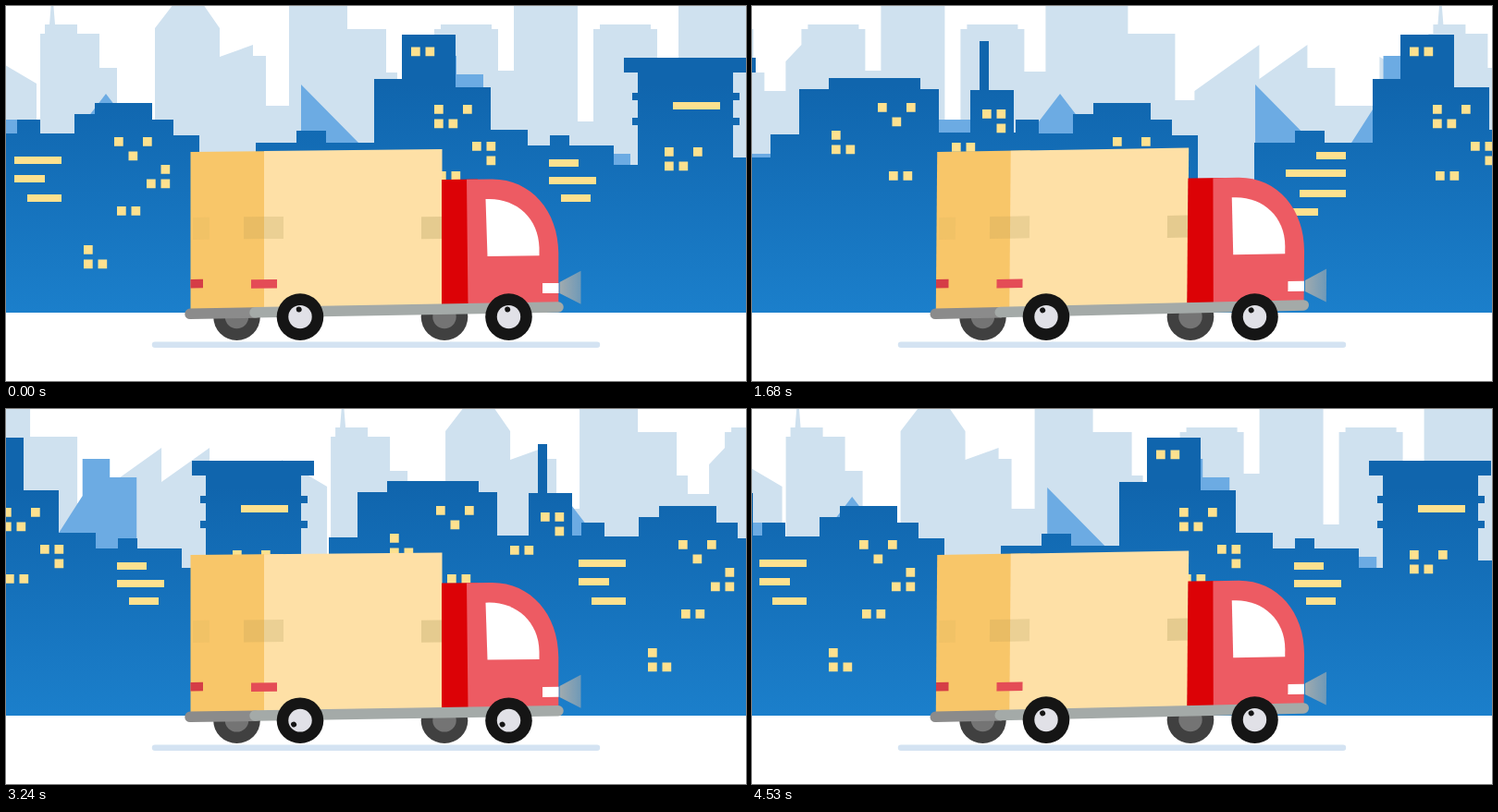
Recreate the animation shown at these times as an HTML page. Size 800 px wide and 406 px high, loop 4.56 s.

```html
<!DOCTYPE html>
<html lang="en">
<head>
<meta charset="utf-8">
<title>Delivery truck</title>
<style>
  html, body { margin: 0; width: 100%; height: 100%; overflow: hidden; background: #fff; }
  svg { display: block; width: 800px; height: 406px; }
  .soft { filter: blur(0.7px); }
</style>
</head>
<body>
<svg viewBox="0 0 800 406">
  <defs>
    <linearGradient id="city" gradientUnits="userSpaceOnUse" x1="0" y1="85" x2="0" y2="332">
      <stop offset="0" stop-color="#1065ad"/>
      <stop offset="1" stop-color="#1b7fcb"/>
    </linearGradient>
    <linearGradient id="beam">
      <stop offset="0" stop-color="#a8adad" stop-opacity=".95"/>
      <stop offset="1" stop-color="#a8adad" stop-opacity=".6"/>
    </linearGradient>
  </defs>

  <g id="far" class="soft" fill="#cfe1ef"></g>
  <g id="mid" class="soft" fill="#6cabe3"></g>
  <g id="near" fill="url(#city)"></g>

  <path d="M161 366.8H639" stroke="#d4e3f2" stroke-width="6.4" stroke-linecap="round"/>

  <g id="back"></g>

  <g id="body">
    <path d="M199.5 158H300V330H199.5z" fill="#f8c669"/>
    <path d="M279 158H471.5V330H279z" fill="#fee0a6"/>
    <g fill="#9a8a4a">
      <path d="M202 229h18v24h-18z" opacity=".07"/>
      <path d="M257 229h22v24h-22z" opacity=".16"/>
      <path d="M279 229h21v24h-21z" opacity=".19"/>
      <path d="M449 231h22v24h-22z" opacity=".25"/>
    </g>
    <path d="M199.5 296H213V305.5H199.5z" fill="#d53d46"/>
    <path d="M265 297H293V306.5H265z" fill="#e44c56"/>
    <path d="M471 191H510V327H471z" fill="#dc0206"/>
    <path d="M498 191H525C567 191 597.3 226 597.3 272V327H499.5z" fill="#ed5b63"/>
    <path d="M518.5 212.5H522C552 212.5 576 234 576.5 266V274.5H520.5z" fill="#fff"/>
    <path d="M580 304.3H597.5V315.3H580z" fill="#fff"/>
    <path d="M598.5 303.5L621.5 291.5V327.5L598.5 315.5z" fill="url(#beam)"/>
    <g stroke-width="11.5" stroke-linecap="round">
      <path d="M199 333.3L270 332.8" stroke="#8b8b8b"/>
      <path d="M269 332.6L597 330.4" stroke="#a4aaa8"/>
    </g>
  </g>

  <g id="front"></g>
</svg>
<script>
const LOOP = 4560, STEP = 30, TURN = 570, BOB = 190;
const GROUND = 332, ROAD = 362, SKY = -5;
const $ = id => document.getElementById(id);

function add(parent, tag, attrs) {
  const el = document.createElementNS('http://www.w3.org/2000/svg', tag);
  for (const key in attrs) el.setAttribute(key, attrs[key]);
  return parent.appendChild(el);
}

// Outline pieces: a box, a block down to the ground, one with a sloping roof
const box = (x, y, w, h) => `M${x} ${y}h${w}v${h}h${-w}z`;
const slab = (x, top, w) => box(x, top, w, GROUND - top);
const slant = (x, y1, w, y2) => `M${x} ${y1}L${x + w} ${y2}V${GROUND}h${-w}z`;
const peak = (x, y, w) => `M${x} ${y}l${w} ${w * 1.31}h${-2 * w}z`;
const notched = x => slab(x, 25, 69) + slab(x + 7, 20, 55);

const farPath = [
  slant(-16, 55, 49, 84),
  slab(37, 67, 83), slab(37, 30, 64), slab(42, 20, 35), 'M47 20L49 -5h2L53 20z',
  `M161 24L181 -2H213L231 24V${GROUND}H161z`,
  slant(231, 55, 36, 42), slab(267, 54, 14), slab(267, 108, 39),
  slab(306, SKY, 63), slab(306, 25, 105), slab(306, 72, 117), slab(306, 92, 140),
  slant(446, 60, 17, 42), notched(463), slab(531, 70, 18),
  slab(549, SKY, 69), slab(549, 125, 86), notched(635), slab(704, 71, 23),
  slab(727, SKY, 89), slab(727, 30, 140), slab(727, 102, 161),
  slant(888, 92, 70, 42), slant(958, 79, 52, 42), slab(1010, 67, 30), slab(1010, 108, 78)
].join('');

const midPath = [
  slant(0, 85, 62, 148),
  slant(104, 148, 34.5, 94), slab(138.5, 54, 29.5), slab(138.5, 74, 58.5),
  slab(300, 160, 56), slab(500, 123, 64), peak(660, 95, 60)
].join('');

const nearPath = [
  // corner house and terrace
  slab(-80, 138, 80), slab(-62, 123, 25),
  slab(0, 140, 135), slab(0, 123, 107), slab(0, 117, 84), slab(22, 105, 62),
  slab(135, 214, 61),
  // office and tower
  slab(196, 148, 128), slab(240, 135, 32),
  slab(324, 134, 166), slab(324, 88, 126), slab(324, 79, 88), slab(354, 31, 58),
  slab(490, 151, 93), slab(514, 140, 21),
  // block with a wide roof and balconies
  slab(583, 172, 26), slab(609, 60, 103), box(594, 56, 132, 16),
  ...[94, 121].map(y => box(603, y, 116, 8)),
  // hall and mast
  slab(712, 164, 30), slab(742, 139, 182), slab(773, 90, 151), slab(805, 78, 99),
  slab(924, 137, 91), slab(958, 91, 47), slab(968, 38, 10)
].join('');

// Lit windows: X marks a pane on a regular grid
const PITCH = 15.5, PANE = 9.7;
const VEE = 'X.X .X.', PAIR = 'XX', CORNER = 'X. XX', HOOK = 'XX .X', STAIR = 'X.X XX.';
const panes = (x, y, pattern) => pattern.split(' ').map((row, j) =>
  [...row].map((c, i) => c === 'X' ? box(x + i * PITCH, y + j * PITCH, PANE, PANE) : '').join('')
).join('');
const strip = (x, y, w) => box(x, y, w, 8);

const lights = [
  panes(43, 142, VEE), panes(78, 172, '.X XX'), panes(46, 217, PAIR), panes(10, 259, CORNER),
  panes(364, 44.5, PAIR), panes(389, 107, STAIR), panes(430, 147, HOOK), panes(392, 179, PAIR),
  panes(638, 153, STAIR), panes(858, 105, VEE), panes(808, 135, CORNER), panes(870, 179, PAIR),
  panes(971, 112, HOOK), panes(938, 148, PAIR),
  strip(-65, 163, 51), strip(-65, 183, 33), strip(-51, 204, 37),
  strip(263, 158, 32), strip(230, 177, 65), strip(245, 199, 50), strip(233, 219, 32),
  strip(513, 166, 32), strip(513, 185, 51), strip(526, 204, 32), strip(647, 104, 51)
].join('');

// Each layer scrolls left at its own speed, in px per ms
const layers = [
  { id: 'far', speed: 0.2438, starts: [0, 1104], path: farPath },
  { id: 'mid', speed: 0.3845, starts: [-1, 0, 1, 2].map(n => 319 + 871 * n), path: midPath },
  { id: 'near', speed: 0.4738, starts: [74, 1142.55, 2219], path: nearPath, lights, snap: true }
];
for (const layer of layers) {
  layer.tiles = layer.starts.map(() => {
    const tile = add($(layer.id), 'g');
    add(tile, 'path', { d: layer.path });
    if (layer.lights) add(tile, 'path', { d: layer.lights, fill: '#fde18f' });
    return tile;
  });
}

function addWheel(id, x, tyre, hub) {
  const wheel = add($(id), 'g', { transform: `translate(${x} 336.6)` });
  add(wheel, 'circle', { r: 25.3, fill: tyre });
  add(wheel, 'circle', { r: 12.7, fill: hub });
  return wheel;
}
for (const x of [249.5, 474]) addWheel('back', x, '#404040', '#747474');
const bolts = [318, 543.5].map(x =>
  add(addWheel('front', x, '#151515', '#e1e1e7'), 'circle', { cy: -8.2, r: 3, fill: '#151515' }));

const move = (el, value) => el.setAttribute('transform', value);

function draw(t) {
  for (const { tiles, starts, speed, snap } of layers) {
    tiles.forEach((tile, i) => {
      const x = starts[i] - speed * t;
      move(tile, `translate(${snap ? Math.round(x) : x})`);
    });
  }

  // The body rocks about its lower rear while the tyres squash on the road
  const wave = Math.sin(2 * Math.PI * t / BOB);
  const tilt = -0.011 + 0.0063 * wave;
  const lean = Math.min(0, 0.01 * wave);
  move($('body'), `matrix(1 ${tilt} ${lean} 1 ${-lean * 243} ${-tilt * 199})`);
  const squash = 1 - 0.07 * Math.max(0, wave);
  for (const id of ['back', 'front']) {
    move($(id), `translate(0 ${ROAD * (1 - squash)}) scale(1 ${squash})`);
  }

  const angle = 360 * t / TURN - 9;
  for (const bolt of bolts) move(bolt, `rotate(${angle})`);
}

const start = performance.now();
function tick() {
  const t = (performance.now() - start) % LOOP;
  draw(Math.floor(t / STEP) * STEP);
  requestAnimationFrame(tick);
}
tick();
</script>
</body>
</html>
```
